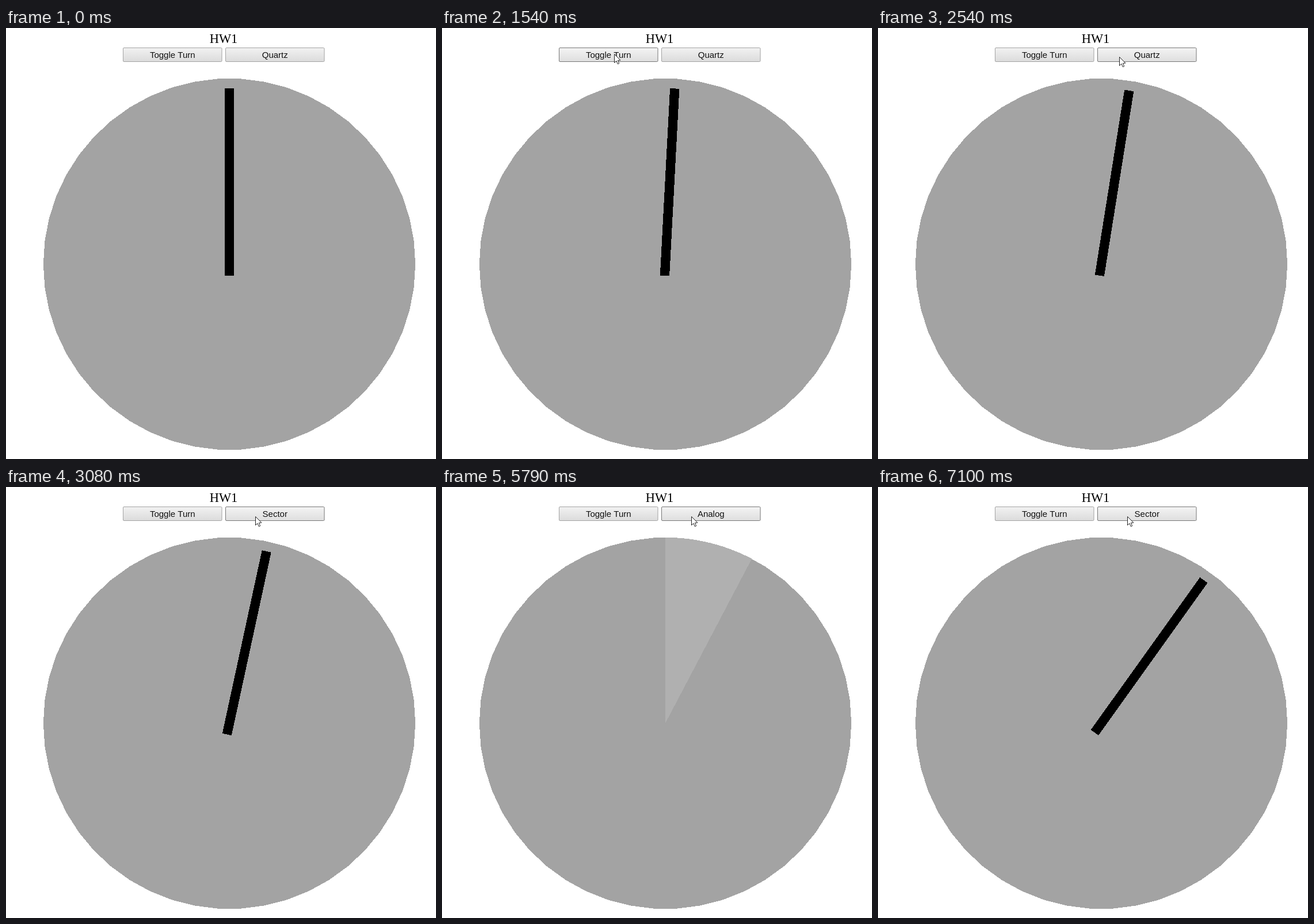
An HTML page with a canvas for the animation above (8 s loop, 747x750 px).

```html
<!DOCTYPE html>
<html lang="en">
<head>
<meta charset="utf-8">
<title>Clock</title>
<style>
html, body { margin: 0; width: 100%; height: 100%; overflow: hidden; background: #fff; }
canvas { display: block; }
</style>
</head>
<body>
<canvas id="stage" width="747" height="750"></canvas>
<script>
const ctx = document.getElementById('stage').getContext('2d');
const LOOP = 8000, STEP = 77.15;
const CX = 388, CY = 411, R = 323.2;
const RAD = Math.PI / 180;

const BUTTONS = [
  { x: 203, y: 34, w: 172.5, h: 25 },
  { x: 381, y: 34, w: 172.5, h: 25 }
];

// Press and release steps of each click, and the button it hits
const CLICKS = [[8, 10, 0], [38, 40, 1], [53, 55, 1], [77, 79, 1], [90, 92, 1]];

const mix = (a, b, p) => a + (b - a) * p;
const clamp = v => Math.max(0, Math.min(1, v));
const smooth = u => u * u * (3 - 2 * u);

// Fills a convex polygon without antialiasing
function fillHard(pts, color) {
  ctx.fillStyle = color;
  const ys = pts.map(p => p[1]);
  const last = Math.round(Math.max(...ys));
  for (let y = Math.round(Math.min(...ys)); y < last; y++) {
    let lo = Infinity, hi = -Infinity;
    pts.forEach(([ax, ay], i) => {
      const [bx, by] = pts[(i + 1) % pts.length];
      if ((ay > y + 0.5) === (by > y + 0.5)) return;
      const x = mix(ax, bx, (y + 0.5 - ay) / (by - ay));
      lo = Math.min(lo, x);
      hi = Math.max(hi, x);
    });
    const left = Math.round(lo), right = Math.round(hi);
    if (right > left) ctx.fillRect(left, y, right - left, 1);
  }
}

// Clock angle in degrees, clockwise from the top
const polar = (deg, r) => [CX + r * Math.sin(deg * RAD), CY - r * Math.cos(deg * RAD)];

function drawFace() {
  fillHard(Array.from({ length: 50 }, (_, i) => polar(90 + i * 7.2, R)), '#a3a3a3');
}

function drawSector(deg) {
  const arc = Array.from({ length: 41 }, (_, i) => polar(deg * i / 40, R));
  fillHard([[CX, CY], ...arc], '#b0b0b0');
}

function drawHand(deg) {
  const c = Math.cos(deg * RAD), s = Math.sin(deg * RAD);
  const box = [[-8.15, -306], [8.15, -306], [8.15, 20], [-8.15, 20]];
  fillHard(box.map(([x, y]) => [CX + x * c - y * s, CY + x * s + y * c]), '#000');
}

function drawButton(b, label, hover, down) {
  const g = ctx.createLinearGradient(0, b.y, 0, b.y + b.h);
  g.addColorStop(0, down ? '#e7e7e7' : hover ? '#f4f4f4' : '#f2f2f2');
  g.addColorStop(1, down ? '#d3d3d3' : hover ? '#dedede' : '#dbdbdb');
  ctx.beginPath();
  ctx.roundRect(b.x + 0.5, b.y + 0.5, b.w - 1, b.h - 1, 1.5);
  ctx.fillStyle = g;
  ctx.fill();
  ctx.lineWidth = 1;
  ctx.strokeStyle = hover ? '#777' : '#a3a3a3';
  ctx.stroke();
  ctx.font = '15px "Liberation Sans", Arial, sans-serif';
  ctx.fillStyle = '#111';
  ctx.fillText(label, b.x + b.w / 2, 52);
}

function drawCursor([x, y]) {
  const shape = [[0, 0], [0, 15], [3.4, 11.8], [5.8, 17.2], [8.2, 16.2], [5.9, 10.9], [10.4, 10.6]];
  ctx.beginPath();
  shape.forEach(([dx, dy]) => ctx.lineTo(x + 0.5 + dx, y + 0.5 + dy));
  ctx.closePath();
  ctx.fillStyle = '#fff';
  ctx.fill();
  ctx.strokeStyle = '#222';
  ctx.stroke();
}

function cursorAt(step) {
  if (step < 1) return null;
  if (step <= 25) {
    const p = 1 - (1 - clamp((step - 1) / 7)) ** 2;
    return [Math.round(mix(621, 299, p)), Math.round(mix(673, 45, p))];
  }
  const p = smooth(clamp((step - 25) / 10));
  return [Math.round(mix(299, 433, p)), Math.round(mix(45, 51, p))];
}

// Three modes: sweeping hand, ticking hand, growing sector
function clockAt(step) {
  const t = step * STEP;
  const label = step < 40 ? 'Quartz' : step < 55 ? 'Sector' : step < 79 ? 'Analog'
    : step < 92 ? 'Quartz' : 'Sector';
  let deg;
  if (step < 40) deg = Math.max(0, 0.006 * (t - 1036));
  else if (step < 55) deg = step < 52 ? 12.2 : 18.2;
  else deg = 0.006 * (Math.min(t, 92 * STEP) - 1172);
  return { label, deg };
}

function draw(time) {
  const step = Math.floor((time % LOOP + 12) / STEP);
  const { label, deg } = clockAt(step);
  const cursor = cursorAt(step);

  ctx.fillStyle = '#fff';
  ctx.fillRect(0, 0, 747, 750);
  ctx.textAlign = 'center';
  ctx.font = '22.4px "Liberation Serif", "Times New Roman", serif';
  ctx.fillStyle = '#000';
  ctx.fillText('HW1', 378, 26);

  BUTTONS.forEach((b, i) => {
    const hover = !!cursor && cursor[0] >= b.x && cursor[0] < b.x + b.w
      && cursor[1] >= b.y && cursor[1] < b.y + b.h;
    const down = CLICKS.some(([from, to, id]) => id === i && step >= from && step < to);
    drawButton(b, i ? label : 'Toggle Turn', hover, down);
  });

  drawFace();
  if (label === 'Analog') drawSector(deg);
  else drawHand(deg);
  if (cursor) drawCursor(cursor);
}

let start;
function tick(now) {
  if (start === undefined) start = now;
  draw(now - start);
  requestAnimationFrame(tick);
}
draw(0);
requestAnimationFrame(tick);
</script>
</body>
</html>
```
